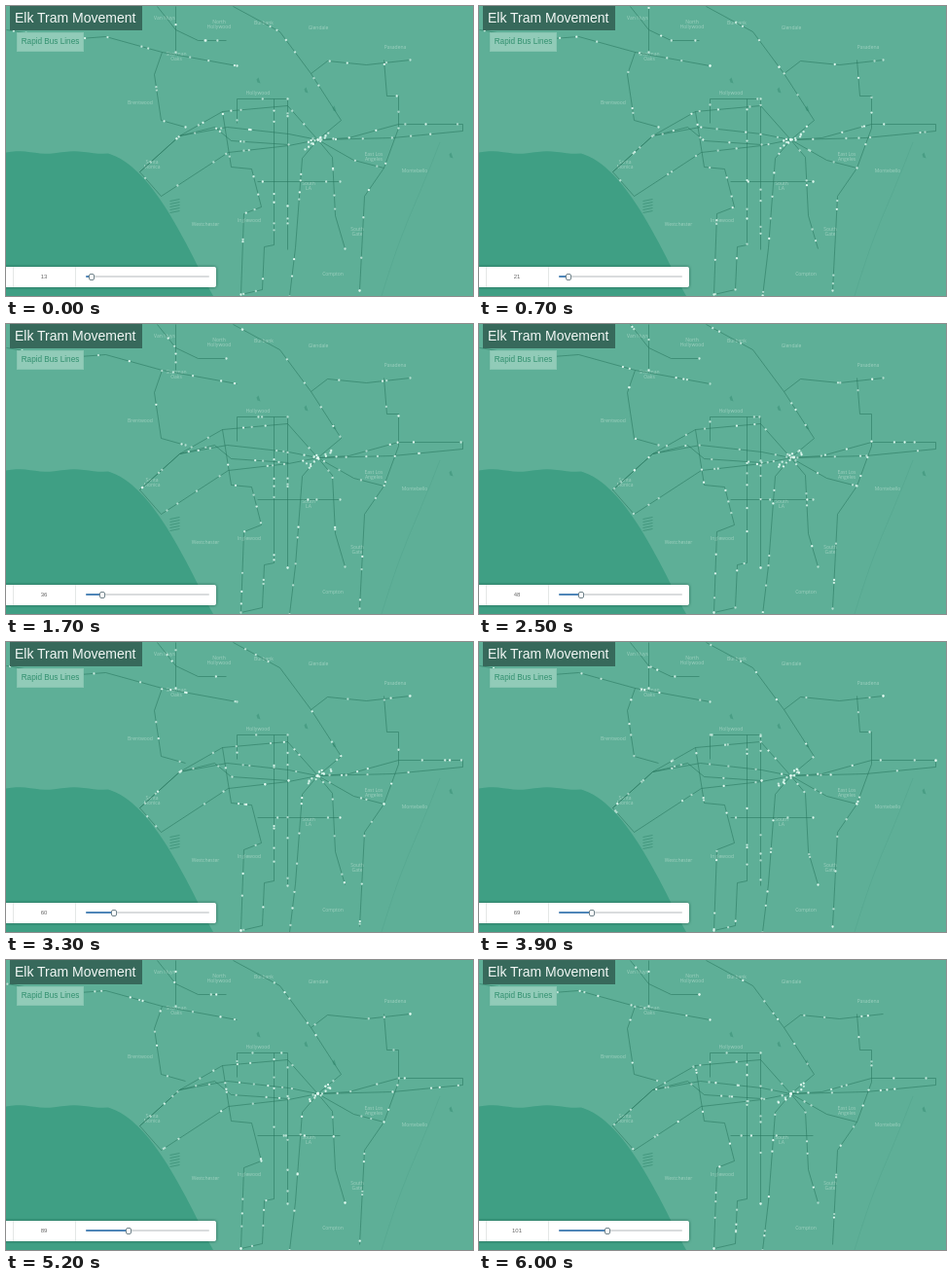
An HTML page with a canvas that plays this animation: 480x298 px, repeating every 6.1 s.

```html
<!DOCTYPE html>
<html lang="en">
<head>
<meta charset="utf-8">
<title>Bus movement map</title>
<style>
  html, body { margin: 0; width: 100%; height: 100%; overflow: hidden; background: #5eaf97; }
  body { position: relative; font-family: "Liberation Sans", Arial, sans-serif; }
  canvas { position: absolute; left: 0; top: 0; }
  div { position: absolute; box-sizing: border-box; white-space: nowrap; }
  #title { left: 4px; top: 0; width: 136px; height: 25px; padding-left: 5px;
    background: #37695b; color: #f2f8f5; font-size: 14px; line-height: 24px; }
  #layer { left: 11px; top: 27px; width: 69px; height: 20px; border: 1px solid #86c5b1;
    background: #91cbb8; color: #32906f; font-size: 8.2px; line-height: 18px; text-align: center; }
  #panel { left: -4px; top: 268px; width: 220px; height: 21px; background: #fff;
    border-radius: 2px; box-shadow: 0 0 3px rgba(15, 65, 50, .7); }
  .rule { top: 0; width: 1px; height: 21px; background: #e4e7e6; }
  #count { left: 23px; top: 0; width: 40px; line-height: 21px; font-size: 6px; color: #666; text-align: center; }
  #track { left: 86px; top: 9px; width: 127px; height: 2px; border-radius: 1px; background: #d9dcdd; }
  #fill { left: 86px; top: 9px; height: 2px; border-radius: 1px; background: #4f86b8; }
  #knob { top: 7px; width: 6px; height: 7px; border: 1px solid #71838b; border-radius: 2px; background: #fff; }
</style>
</head>
<body>
<canvas id="map" width="480" height="298"></canvas>
<div id="title">Elk Tram Movement</div>
<div id="layer">Rapid Bus Lines</div>
<div id="panel">
  <div class="rule" style="left:11px"></div>
  <div class="rule" style="left:75px"></div>
  <div id="count"></div>
  <div id="track"></div><div id="fill"></div><div id="knob"></div>
</div>
<script>
const LOOP = 6100, STEP = 100;
const BUS_GAP = 25, DWELL = 24;
const $ = id => document.getElementById(id);
const ctx = $('map').getContext('2d');

// Junctions shared by several routes
const centre = [320, 137], pier = [137, 170], west = [178, 133];
const valley = [160, 47], north = [313, 69], east = [388, 166];

const routes = [
  [[0, 24], [62, 34], [102, 31], valley, [237, 61]],
  [[155, 0], [174, 24], [197, 35], [226, 35]],
  [[174, 0], [174, 47]],
  [valley, [152, 70], [159, 117], [184, 124]],
  [[233, 0], [281, 26], north, [344, 117], centre],
  [north, [330, 56], [370, 60], [415, 55]],
  [[388, 55], [391, 92], [403, 92], [403, 125], east],
  [[237, 120], [237, 95], [289, 95]],
  [pier, west, [222, 108], [289, 102], centre],
  [pier, west, [227, 124], [290, 131], centre],
  [centre, [352, 135], [403, 121], [469, 121], [469, 128], [397, 135], centre],
  [pier, [159, 195], [228, 150], [290, 143], centre],
  [west, [214, 124], [231, 138], [290, 142]],
  [[275, 95], [275, 245], [265, 247], [263, 291], [241, 296]],
  [[289, 95], [289, 250]],
  [centre, [304, 156], [297, 248], [291, 298]],
  [[222, 108], [231, 165], [252, 167], [262, 206], [244, 213], [241, 296]],
  [[258, 180], [343, 180]],
  [centre, [335, 155], [338, 215], [348, 249]],
  [centre, [357, 158], east, [368, 195], [363, 292]]
].map(points => {
  const lengths = points.slice(1).map((p, i) => Math.hypot(p[0] - points[i][0], p[1] - points[i][1]));
  const total = lengths.reduce((a, b) => a + b);
  return { points, lengths, total, buses: Math.round(total / BUS_GAP) };
});

const labels = [
  ['Van Nuys', 163, 14], ['North/Hollywood', 219, 18], ['Burbank', 265, 19], ['Glendale', 321, 24],
  ['Pasadena', 400, 44], ['Sherman/Oaks', 175, 51], ['Hollywood', 259, 91], ['Brentwood', 138, 101],
  ['Santa/Monica', 150, 162], ['Westchester', 205, 226], ['Inglewood', 250, 222], ['South/LA', 311, 184],
  ['South/Gate', 361, 231], ['Compton', 336, 277], ['East Los/Angeles', 378, 154], ['Montebello', 420, 171]
];

const hash = n => { const v = Math.sin(n * 127.1 + 3.7) * 43758.5453; return v - Math.floor(v); };

function trace(points) {
  ctx.beginPath();
  points.forEach(([x, y]) => ctx.lineTo(x + .5, y + .5));
}

function pointAt({ points, lengths }, distance) {
  let i = 0;
  while (i < lengths.length - 1 && distance > lengths[i]) distance -= lengths[i++];
  const k = Math.min(1, distance / lengths[i]), [a, b] = [points[i], points[i + 1]];
  return [a[0] + (b[0] - a[0]) * k, a[1] + (b[1] - a[1]) * k];
}

function drawLand() {
  ctx.fillStyle = '#5eaf97';
  ctx.fillRect(0, 0, 480, 298);

  ctx.fillStyle = '#3f9f84';
  ctx.beginPath();
  ctx.moveTo(0, 298);
  for (let x = 0; x <= 105; x += 5) ctx.lineTo(x, 150.5 - 1.3 * Math.cos((x - 70) / 9));
  ctx.bezierCurveTo(150, 165, 183, 240, 213, 298);
  ctx.fill();

  // Small parks and the marina
  ctx.fillStyle = 'rgba(52,139,114,.5)';
  for (const [x, y] of [[306, 83], [257, 73], [455, 150], [335, 102]]) {
    trace([[x, y + 2], [x + 2, y], [x + 4, y + 6], [x + 1, y + 5]]);
    ctx.fill();
  }
  ctx.strokeStyle = '#43977e';
  ctx.lineWidth = 1;
  for (let y = 199; y < 213; y += 3) {
    trace([[168, y + 1], [178, y - 1]]);
    ctx.stroke();
  }

  ctx.strokeStyle = 'rgba(75,157,132,.3)';
  ctx.beginPath();
  ctx.moveTo(446, 140);
  ctx.bezierCurveTo(415, 220, 410, 220, 386, 298);
  ctx.stroke();
}

function drawLabels() {
  ctx.font = '5px "Open Sans", sans-serif';
  ctx.textAlign = 'center';
  ctx.fillStyle = 'rgba(180,220,206,.75)';
  for (const [text, x, y] of labels)
    text.split('/').forEach((line, i) => ctx.fillText(line, x, y + i * 5));
}

function drawRoutes() {
  ctx.strokeStyle = 'rgba(38,116,92,.6)';
  ctx.lineWidth = .9;
  ctx.lineJoin = 'round';
  for (const { points } of routes) {
    trace(points);
    ctx.stroke();
  }
}

function dot(x, y, seed) {
  ctx.fillStyle = `rgba(228,252,243,${.6 + .4 * hash(seed + 500)})`;
  ctx.beginPath();
  ctx.arc(x + .5, y + .5, 1.15, 0, 7);
  ctx.fill();
}

// Buses shuttle between the ends of their route and wait there
function drawBuses(seconds) {
  routes.forEach((route, r) => {
    const cycle = 2 * (route.total + DWELL);
    for (let i = 0; i < route.buses; i++) {
      const seed = r * 31 + i;
      const start = (i + hash(seed)) / route.buses * cycle;
      const s = (start + (20 + 14 * hash(seed + 900)) * seconds) % cycle;
      dot(...pointAt(route, Math.min(s, cycle - s, route.total)), seed);
    }
  });

  // Slow traffic crowding the centre
  for (let i = 0; i < 14; i++) {
    const along = (hash(i + 70) + seconds * .12) % 1 - .5;
    dot(centre[0] + along * 28, centre[1] - along * 16 + (hash(i + 90) - .5) * 7, i);
  }
}

function drawPanel(seconds) {
  const n = Math.max(13, Math.round(10.4 + 15.1 * seconds)), x = 80.6 + n / 2;
  $('count').textContent = n;
  $('fill').style.width = x - 82 + 'px';
  $('knob').style.left = x + 1.4 + 'px';
}

function frame(now) {
  const seconds = Math.floor(now % LOOP / STEP) * STEP / 1000;
  drawLand();
  drawLabels();
  drawRoutes();
  drawBuses(seconds);
  drawPanel(seconds);
  requestAnimationFrame(frame);
}
frame(0);
</script>
</body>
</html>
```
